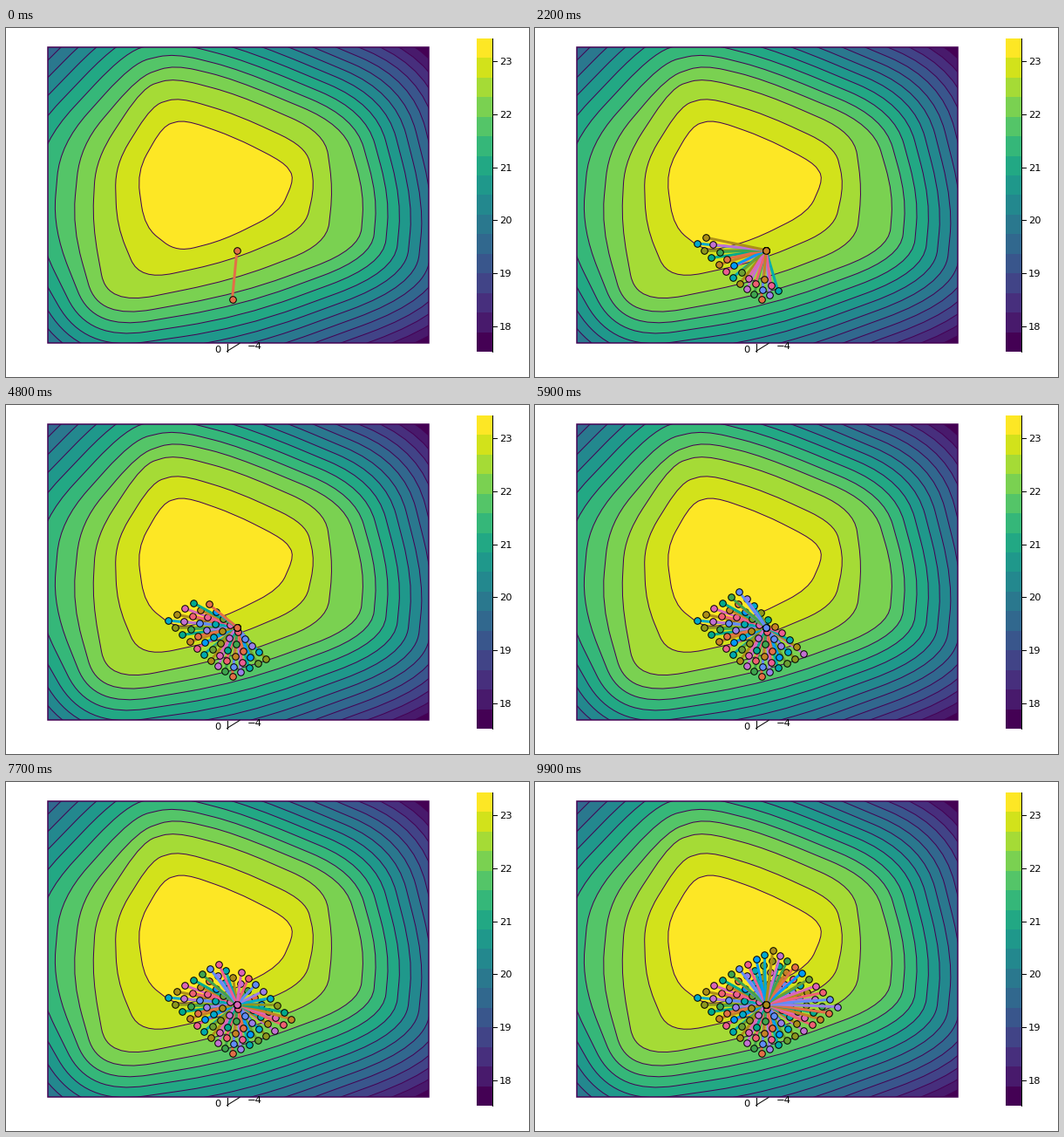
A matplotlib script that plays this animation: 600 px wide and 400 px high, repeating every 10000 ms.

```python
import numpy as np
import matplotlib.pyplot as plt
from matplotlib.animation import FuncAnimation
from matplotlib.patches import PathPatch, Rectangle
from matplotlib.path import Path

W, H, DPI = 600, 400, 100
PX = 72 / DPI
BOX = (48, 22), 437, 339
BANDS = 16
SIDE = 10
PURPLE = "#440154"
HUB = (265, 254.6)

PALETTE = ["#009afa", "#e36f47", "#3ea44e", "#c371d2",
           "#ac8e18", "#00aaae", "#ed5e93", "#c68225",
           "#00a98d", "#8e971e", "#00a9cc", "#9b7fe9",
           "#618df6", "#f06073", "#dd65b6", "#6c9f33"]

# Corners of a few contours, clockwise from the upper left.
CORNERS = {
    1: [(180, 112), (205, 105), (262, 125), (319, 154), (331, 172),
        (314, 211), (250, 243), (196, 257), (159, 228), (150, 165)],
    3: [(157, 68), (193, 57), (265, 76), (366, 120), (375, 185),
        (368, 248), (260, 289), (116, 318), (99, 225), (103, 150)],
    4: [(152, 56), (193, 42), (260, 58), (388, 111), (411, 190),
        (406, 254), (270, 304), (106, 334), (76, 228), (85, 135)],
    10: [(117, -32), (194, -30), (300, 0), (457, 66), (492, 205),
         (482, 303), (270, 380), (75, 402), (-45, 240), (-40, 125)],
}

plt.rcParams["font.family"] = "DejaVu Sans"


def corners(n):
    """Corners of contour n; the spacing tightens outwards."""
    keys = list(CORNERS)
    k = min(np.searchsorted(keys, n, side="right"), len(keys) - 1)
    a, b = keys[k - 1], keys[k]
    f = (n ** 0.75 - a ** 0.75) / (b ** 0.75 - a ** 0.75)
    return (1 - f) * np.array(CORNERS[a]) + f * np.array(CORNERS[b])


def rounded(p, cut=0.38):
    """Closed path through polygon p with rounded corners."""
    before = p + cut * (np.roll(p, 1, axis=0) - p)
    after = p + cut * (np.roll(p, -1, axis=0) - p)
    verts = np.stack([before, p, after], axis=1).reshape(-1, 2)
    codes = [Path.LINETO, Path.CURVE3, Path.CURVE3] * len(p)
    codes[0] = Path.MOVETO
    return Path(np.vstack([verts, verts[:1]]), codes + [Path.CLOSEPOLY])


def sample(k):
    """Ray end k: a skewed grid on a gently bent surface."""
    u, v = (i / (SIDE - 1) for i in divmod(k, SIDE))
    bend = (np.sin(np.pi * u) * (1 - 1.7 * v)
            + np.sin(np.pi * v) * (1 - 1.7 * u))
    return (259.5 + 87 * u - 73.5 * v,
            311 - 53.5 * u - 64 * v - u * v + 3.5 * bend)


fig = plt.figure(figsize=(W / DPI, H / DPI), dpi=DPI, facecolor="white")
ax = fig.add_axes([0, 0, 1, 1])
ax.set_xlim(0, W)
ax.set_ylim(H, 0)
ax.axis("off")


def shade(i):
    return plt.cm.viridis(i / (BANDS - 1))


def stroke(xs, ys, color="black", width=1, **kw):
    return ax.plot(xs, ys, color=color, lw=width * PX, **kw)[0]


def label(x, y, text, ha="center"):
    ax.text(x, y, text, size=11.5 * PX, ha=ha, va="center_baseline")


def draw_field():
    frame = Rectangle(*BOX, fc=shade(0), ec="none", zorder=1)
    ax.add_patch(frame)
    for n in range(BANDS - 1, 0, -1):
        ring = PathPatch(rounded(corners(n)), fc=shade(BANDS - n),
                         ec=PURPLE, lw=PX, zorder=1)
        ax.add_patch(ring)
        ring.set_clip_path(frame)
    ax.add_patch(Rectangle(*BOX, fill=False, ec=PURPLE, lw=1.5 * PX,
                           zorder=1))


def draw_axes():
    stroke([253.5, 253.5], [362, 370.5])
    stroke([253.5, 268], [370.5, 361.5])
    label(243, 367.5, "0")
    label(285, 364.5, "\u22124")


def draw_colorbar(x0=540, x1=558, y0=11.7, y1=371.2):
    step = (y1 - y0) / BANDS
    for i in range(BANDS):
        ax.add_patch(Rectangle((x0, y1 - (i + 1) * step), x1 - x0, step,
                               fc=shade(i), ec="none"))
    stroke([x1, x1], [y0, y1])
    for value in range(18, 24):
        y = 342 - 60.8 * (value - 18)
        stroke([x1, x1 + 5], [y, y])
        label(x1 + 8, y, str(value), ha="left")


draw_field()
draw_axes()
draw_colorbar()

rays = []
for k in range(SIDE * SIDE):
    x, y = sample(k)
    rays.append(stroke([HUB[0], x], [HUB[1], y],
                       PALETTE[(k + 1) % len(PALETTE)], 3,
                       marker="o", ms=7.6 * PX, mec="black", mew=PX,
                       zorder=5, visible=False))


def update(n):
    for k, ray in enumerate(rays):
        ray.set_visible(k <= n)
    return rays


anim = FuncAnimation(fig, update, frames=SIDE * SIDE, interval=100,
                     repeat=True, repeat_delay=0, blit=False)
plt.show()
```
